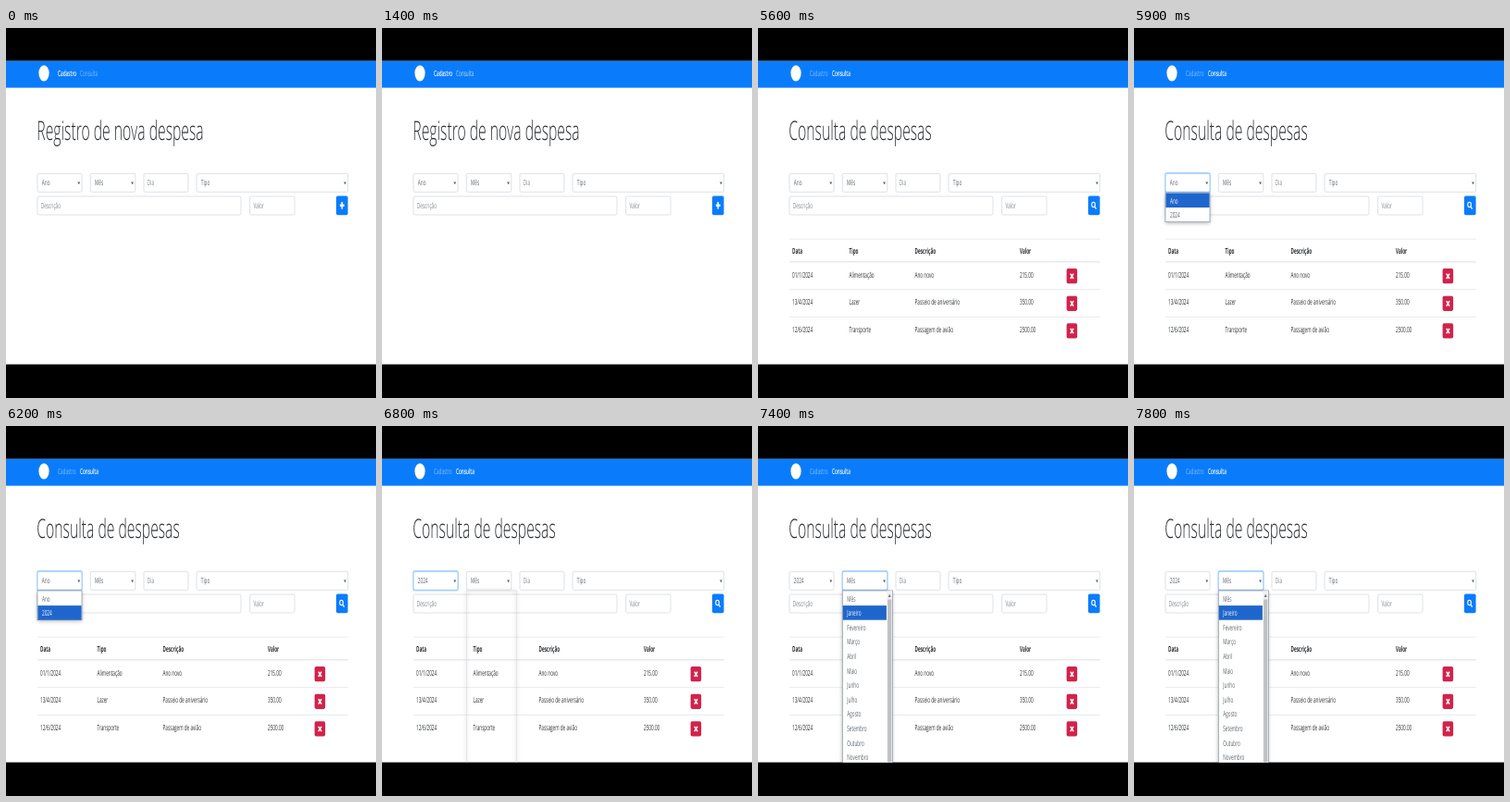
Animation of 400 by 400 pixels, one loop 8000 ms. Source, as an HTML page with a canvas:

```html
<!DOCTYPE html>
<html lang="pt">
<head>
<meta charset="utf-8">
<style>
html, body { margin: 0; width: 100%; height: 100%; overflow: hidden; background: #000; }
canvas { display: block; width: 400px; height: 400px; }
</style>
</head>
<body>
<canvas width="400" height="400"></canvas>
<script>
const c = document.querySelector('canvas').getContext('2d');
const LOOP = 8000, SQUEEZE = 0.55; // the wide page is shown squeezed into a square
const TOP = 35.4, BOTTOM = 363.8;
const BLUE = '#0a7cfb', DARK = '#2b2f33', FIELD = '#5c646b', HINT = '#7f878e', PICK = '#1f66cc';
const MONTHS = ['Mês', 'Janeiro', 'Fevereiro', 'Março', 'Abril', 'Maio', 'Junho', 'Julho',
  'Agosto', 'Setembro', 'Outubro', 'Novembro'];
const ROWS = [
  ['01/1/2024', 'Alimentação', 'Ano novo', '215.00'],
  ['13/4/2024', 'Lazer', 'Passeio de aniversário', '350.00'],
  ['12/6/2024', 'Transporte', 'Passagem de avião', '2500.00']
];
const COLUMNS = [37, 98.5, 169.5, 283];

function text(s, x, y, color = DARK, weight = 400, size = 8.5) {
  c.save();
  c.translate(x, y);
  c.scale(SQUEEZE, 1);
  c.font = `${weight} ${size}px "Open Sans", "Noto Sans", sans-serif`;
  c.textRendering = 'geometricPrecision';
  c.fillStyle = color;
  c.fillText(s, 0, 0);
  c.restore();
}

function rect(x, y, w, h, color) {
  c.fillStyle = color;
  c.fillRect(x, y, w, h);
}

function round(x, y, w, h, fill, stroke, line = 0.7) {
  c.beginPath();
  c.roundRect(x, y, w, h, 1.8);
  if (fill) { c.fillStyle = fill; c.fill(); }
  if (stroke) { c.strokeStyle = stroke; c.lineWidth = line; c.stroke(); }
}

function path(points, color, line) {
  c.beginPath();
  points.forEach(([x, y, move]) => move ? c.moveTo(x, y) : c.lineTo(x, y));
  if (line) { c.strokeStyle = color; c.lineWidth = line; c.stroke(); }
  else { c.fillStyle = color; c.fill(); }
}

function field(label, x, y, w, focus = false, color = HINT, inset = 3.8) {
  if (focus) round(x - 0.8, y - 1.2, w + 1.6, 22.4, '#b3d7ff');
  round(x, y, w, 20, '#fff', focus ? '#80bdff' : '#ced4da');
  text(label, x + inset, y + 13, color);
}

function select(label, x, w, focus) {
  field(label, x, 157.3, w, focus, FIELD, 4.8);
  const ax = x + w - 3.2;
  path([[ax - 1.4, 166.4, 1], [ax + 1.4, 166.4], [ax, 169.2]], '#555c63');
}

function popup(x, w, h, items, picked, scroll, alpha) {
  c.save();
  c.shadowColor = 'rgba(0,0,0,.3)';
  c.shadowBlur = 4;
  c.shadowOffsetY = 1;
  c.globalAlpha = alpha;
  rect(x, 178, w, h, '#fff');
  c.shadowColor = 'transparent';
  c.strokeStyle = '#8495a8';
  c.lineWidth = 0.7;
  c.strokeRect(x, 178, w, h);
  const inner = scroll ? w - 6 : w;
  items.forEach((s, i) => {
    const y = 178.5 + i * 15.6, on = i === picked;
    if (on) rect(x + 0.4, y, inner - 0.8, 15.6, PICK);
    text(s, x + 5, y + 11, on ? '#fff' : FIELD);
  });
  if (scroll) {
    rect(x + inner, 178.4, 5.6, h, '#f1f1f1');
    path([[x + inner + 1.4, 185, 1], [x + inner + 4.4, 185], [x + inner + 2.9, 181.5]], '#777');
    rect(x + inner + 0.8, 187.5, 4.2, h, '#c1c1c1');
  }
  c.restore();
}

// faint shadow outline shown while a long list is opening
function ghost(x, w) {
  c.save();
  c.shadowColor = 'rgba(0,0,0,.3)';
  c.shadowBlur = 4;
  c.strokeStyle = '#dcdedf';
  c.lineWidth = 0.7;
  c.strokeRect(x, 178, w, 200);
  c.restore();
}

function actionButton(search) {
  round(357, 181.4, 12.6, 20.8, BLUE);
  if (search) {
    c.beginPath();
    c.ellipse(362.6, 191, 1.8, 2.7, 0, 0, 7);
    c.strokeStyle = '#fff';
    c.lineWidth = 1.1;
    c.stroke();
    path([[363.9, 193, 1], [365.6, 195.6]], '#fff', 1.3);
  } else {
    rect(360.9, 190.6, 4.8, 2.4, '#fff');
    rect(362.5, 188, 1.6, 7.6, '#fff');
  }
}

function table() {
  rect(34, 227.8, 336, 0.7, '#dee2e6');
  rect(34, 252.3, 336, 1.1, '#dee2e6');
  ['Data', 'Tipo', 'Descrição', 'Valor'].forEach((s, i) => text(s, COLUMNS[i], 244, DARK, 700));
  ROWS.forEach((row, r) => {
    const y = r * 29.6;
    if (r) rect(34, 252.8 + y, 336, 0.7, '#dee2e6');
    row.forEach((s, i) => text(s, COLUMNS[i], 269.7 + y));
    round(333.6, 260.1 + y, 11.5, 16.2, '#d2234a');
    path([[337.8, 265.6 + y, 1], [341, 271 + y], [341, 265.6 + y, 1], [337.8, 271 + y]], '#fff', 1.5);
  });
}

function draw(t) {
  const query = t >= 2700;
  const yearFocus = t >= 5800 && t < 6900;
  const monthOpen = t >= 6900;

  rect(0, 0, 400, 400, '#000');
  c.save();
  c.beginPath();
  c.rect(0, TOP, 400, BOTTOM - TOP);
  c.clip();
  rect(0, TOP, 400, BOTTOM - TOP, '#fff');
  rect(0, TOP, 400, 64.6 - TOP, BLUE);
  c.beginPath();
  c.ellipse(41, 48.8, 5.6, 8.6, 0, 0, 7);
  c.fillStyle = '#fff';
  c.fill();

  const dim = 'rgba(255,255,255,.5)', hover = 'rgba(255,255,255,.75)';
  text('Cadastro', 56, 52.3, query ? dim : '#fff', query ? 400 : 600);
  text('Consulta', 80, 52.3, query ? '#fff' : t >= 1400 ? hover : dim, query ? 600 : 400);
  text(query ? 'Consulta de despesas' : 'Registro de nova despesa', 33.3, 121.3, DARK, 300, 28.6);

  select(t >= 6400 ? '2024' : 'Ano', 34, 48, yearFocus);
  select('Mês', 91.3, 48.5, monthOpen);
  field('Dia', 149, 157.3, 48);
  select('Tipo', 206, 163.7);
  field('Descrição', 34, 182, 220);
  field('Valor', 263.7, 182, 48.3);
  actionButton(query);
  if (query) table();

  if (t >= 5900 && t < 6500)
    popup(34, 48, 31.7, ['Ano', '2024'], t >= 6200 ? 1 : 0, false, t >= 6400 ? 0.3 : 1);
  if (t >= 6800 && !monthOpen) ghost(91.3, 54);
  if (monthOpen) {
    const picked = t < 7400 ? 0 : t >= 7500 && t < 7800 ? 2 : 1;
    popup(91.3, 54, 200, MONTHS, picked, true, 1);
  }
  c.restore();
}

const start = performance.now();
function tick() {
  draw((performance.now() - start) % LOOP);
  requestAnimationFrame(tick);
}
tick();
</script>
</body>
</html>
```
